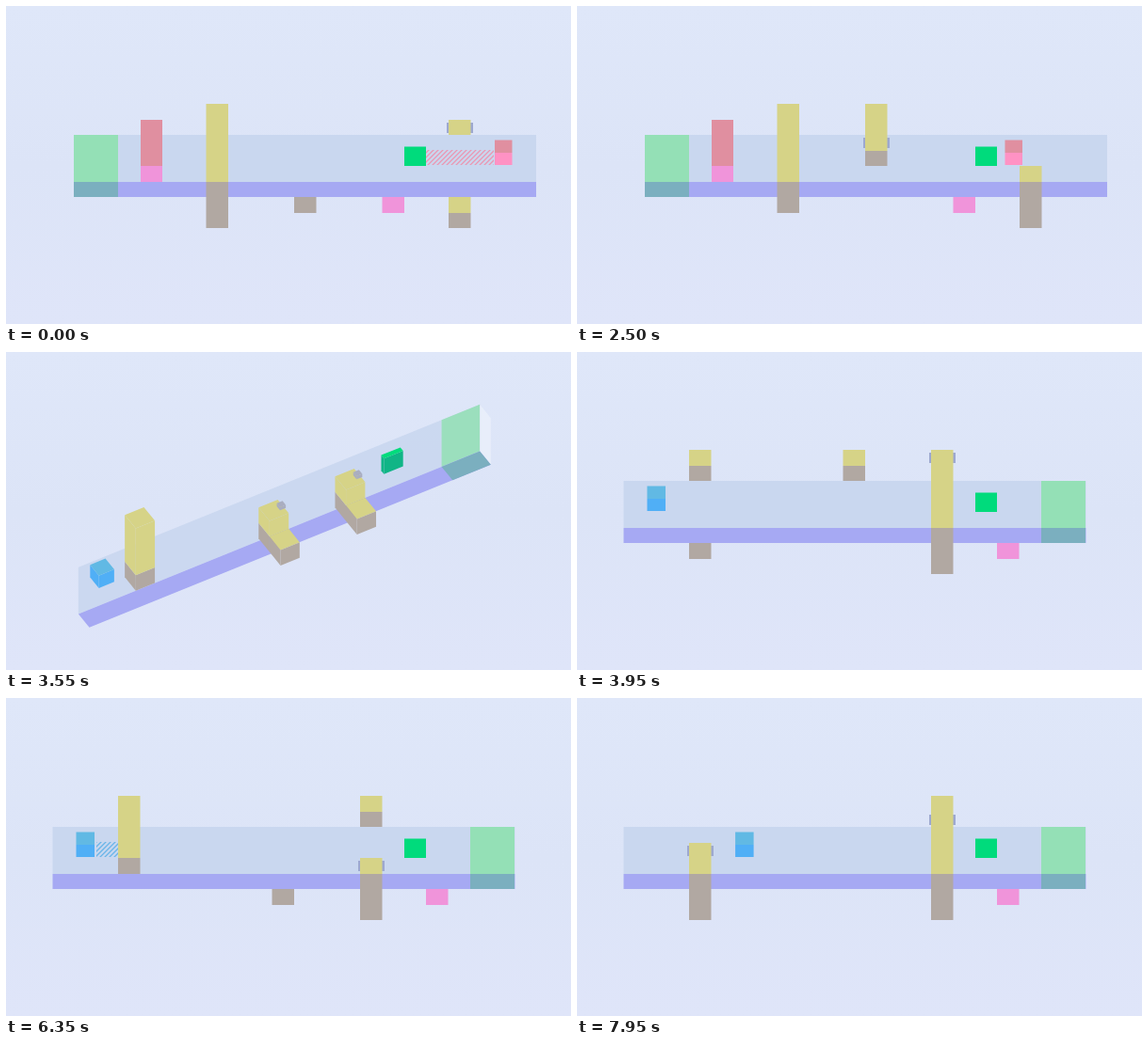
An HTML page with a canvas for the animation above (8 s loop, 600x338 px).

```html
<!DOCTYPE html>
<html lang="en">
<head>
<meta charset="utf-8">
<title>Turning bridge</title>
<style>
html, body { margin: 0; width: 100%; height: 100%; overflow: hidden; background: #dfe6f9; }
canvas { display: block; width: 600px; height: 338px; }
</style>
</head>
<body>
<canvas id="stage" width="600" height="338"></canvas>
<script>
const ctx = document.getElementById('stage').getContext('2d');
const LOOP = 8000, TURN_START = 2661, TURN_END = 3861, RING_PERIOD = 4800;
const UNIT = 23.4, ROW = 16.55, CX = 306, CY = 195, FLOOR_ROW = 5;
const C = {
  yellow: '#d6d387', brown: '#b1a8a2', floor: '#a6a9f3', teal: '#7bafbf',
  glass: '#c9d7ef', start: '#94e0b6', gate: '#f2f6fd', red: '#e08fa0',
  magenta: '#f094da', pink: '#ff92c4', sky: '#61b9e4', blue: '#50aff6',
  green: '#00db7c', deep: '#10b586', ring: '#9da8d0', peg: '#a9adc0'
};

const clamp = (v, a, b) => Math.min(b, Math.max(a, v));
const rowY = r => Math.round(104 + ROW * r);
const still = v => () => v;
// Straight motion through three key points at p = 0, 1 and 2.
const path = (a, b, c) => p => p < 1 ? a + (b - a) * p : b + (c - b) * (p - 1);
const wave = (mid, size, peak) => t =>
  Math.round(mid + size * Math.cos(2 * Math.PI * (t - peak) / RING_PERIOD));

function rect(x, y0, x1, y1, color) {
  ctx.fillStyle = color;
  ctx.fillRect(x, y0, x1 - x, y1 - y0);
}

function background() {
  const g = ctx.createLinearGradient(0, 0, 0, 338);
  g.addColorStop(0, '#dfe7f9');
  g.addColorStop(.5, '#dce4f7');
  g.addColorStop(1, '#dfe5f9');
  rect(0, 0, 600, 338, g);
}

function bridge(x, startX) {
  rect(x, 137, x + 491, 187, C.glass);
  rect(x, 187, x + 491, 203, C.floor);
  rect(startX, 137, startX + 47, 187, C.start);
  rect(startX, 187, startX + 47, 203, C.teal);
}

// Brown front below the floor edge; a single row shows one face only.
function piece(x, top, end) {
  if (end <= top) return;
  let split = Math.min(Math.max(FLOOR_ROW, top + 1), end - 1);
  if (end - top === 1 && top < FLOOR_ROW) split = end;
  rect(x, rowY(top), x + 23.5, rowY(split), C.yellow);
  rect(x, rowY(split), x + 23.5, rowY(end), C.brown);
}

// A column on the row grid with a gap that opens around one row.
function column({ x, top, end, gap = still(0), gapAt = 4, ring = still(-1) }, p, t) {
  const a = Math.round(top(p)), b = Math.round(end(p)), half = Math.round(gap(p) / 2);
  const r = ring(t), inGap = half && r >= gapAt - half && r < gapAt + half;
  if (r >= a && r < b && !inGap) rect(x - 2, rowY(r) + 3, x + 26, rowY(r) + 14, C.ring);
  if (!half) return piece(x, a, b);
  piece(x, a, gapAt - half);
  piece(x, gapAt + half, b);
}

const front = [
  { x: 212.5, top: still(0), end: path(8, 8, 7), gap: path(0, 2, 0), ring: wave(-1, 2, 1250) },
  { x: 306, top: path(6, 4, 0), end: path(7, 8, 4), ring: wave(3, 3, 1050) },
  { x: 470, top: path(1, 0, 4), end: path(8, 6, 8), gap: path(4, 0, 0), ring: wave(2, 2, 1600) }
];
const back = [
  { x: 376, top: still(0), end: still(8), gap: path(0, 2, 0), gapAt: 3, ring: wave(2, 2, 6350) },
  { x: 282.5, top: path(0, 6, 7), end: path(2, 7, 7) },
  { x: 119, top: path(0, 0, 3), end: path(7, 5, 8), gap: path(4, 0, 0), ring: wave(0, 3, 8000) }
];

function columns(list, t, start, mid, end) {
  const p = t < mid ? (t - start) / (mid - start) : 1 + (t - mid) / (end - mid);
  list.forEach(c => column(c, clamp(p, 0, 2), t));
}

function hatch(x0, x1, color, t) {
  ctx.save();
  ctx.beginPath();
  ctx.rect(x0, 153, x1 - x0, 16);
  ctx.clip();
  ctx.strokeStyle = color;
  ctx.lineWidth = 1.3;
  ctx.beginPath();
  for (let x = x0 - 24 + t * .02 % 5; x < x1; x += 5) {
    ctx.moveTo(x, 170);
    ctx.lineTo(x + 18, 152);
  }
  ctx.stroke();
  ctx.restore();
}

const slide = (t, start) => clamp((t - start) * .14, 0, 4 * UNIT);

function player(x, w, top, face) {
  rect(x, 142.5, x + w, 156, top);
  rect(x, 156, x + w, 169, face);
}

function frontView(t) {
  bridge(72, 72);
  rect(143, 121, 166, 170, C.red);
  rect(143, 170, 166, 187, C.magenta);
  rect(399.5, 203, 423, 220, C.magenta);
  if (t < 2040) hatch(446, 518, '#ea96b2', t);
  player(519 - slide(t, 2040), 18.5, C.red, C.pink);
  rect(423, 149.5, 446, 170, C.green);
  columns(front, t, 0, 1250, 2500);
}

function backView(t) {
  bridge(49.5, 493);
  rect(446, 203, 469.5, 220, C.magenta);
  if (t > 5150 && t < 7280) hatch(96, 119, '#69b5e8', t);
  player(74.5 + slide(t, 7280), 19.5, C.sky, C.blue);
  rect(423, 149.5, 446, 170, C.green);
  columns(back, t, 3950, 6350, 7950);
}

function turningView(angle) {
  const s = Math.sin(angle), c = Math.cos(angle), near = Math.sign(c) || 1;

  function quad(color, ...points) {
    ctx.fillStyle = color;
    ctx.beginPath();
    for (const [x, h, z] of points)
      ctx.lineTo(CX + UNIT * (x * c - z * s), CY + ROW * (x * s + z * c - h));
    ctx.fill();
  }
  const flat = (x0, x1, z0, z1, h, color) =>
    quad(color, [x0, h, z0], [x1, h, z0], [x1, h, z1], [x0, h, z1]);
  const along = (x0, x1, z, h0, h1, color) =>
    quad(color, [x0, h0, z], [x1, h0, z], [x1, h1, z], [x0, h1, z]);
  const across = (x, z0, z1, h0, h1, color) =>
    quad(color, [x, h0, z0], [x, h0, z1], [x, h1, z1], [x, h1, z0]);

  // Box around (x, z): lower colour up to split, upper colour above and on top.
  function box(x, z, w, d, h0, split, h1, upper = C.yellow, lower = C.brown) {
    if (Math.abs(c) > .85 && z * near > .5) return;
    const x0 = x - w / 2, x1 = x + w / 2, z0 = z - d / 2, z1 = z + d / 2;
    for (const [a, b, color] of [[h0, split, lower], [split, h1, upper]]) {
      along(x0, x1, near > 0 ? z1 : z0, a, b, color);
      across(x1, z0, z1, a, b, color);
    }
    flat(x0, x1, z0, z1, h1, upper);
  }
  const cube = (x, z, upper, lower) => box(x, z, .8, .8, 1.07, 1.87, 1.87, upper, lower);
  const panel = (x, z, upper, lower) => box(x, z, 1, .25, 1, 2, 2, upper, lower);
  const peg = (x, z, h) => box(x, z, .3, .3, h, h, h + .2, C.peg, C.peg);

  ctx.globalAlpha = Math.abs(c);
  along(-10, 11, -near / 2, 0, 3, C.glass);
  along(-10, -8, -near / 2, 0, 3, C.start);
  ctx.globalAlpha = s;
  across(-10, -.5, .5, 0, 3, C.gate);
  ctx.globalAlpha = 1;

  panel(-5.5, .65, C.green, C.deep);
  flat(-10, 11, -.5, .5, 0, C.floor);
  flat(-10, -8, -.5, .5, 0, C.teal);

  for (const x of [-3.5, .5]) {
    for (const z of [-near, 0, near])
      if (x < 0 || z >= 0) box(x, z, 1, 1, -1, 0, z < 0 ? 4 : z);
    peg(x - .4, 1, 1);
  }
  box(-6.5, -1, 1, 1, 0, 1, 3, '#eba0b2', '#f892dc');

  cube(5.5, -1.07, C.red, C.pink);
  panel(5.5, -.65, C.green, C.deep);
  panel(5.5, -1.47);
  peg(5.1, -1.07, 2);

  cube(9.5, .95, C.sky, C.blue);
  box(7.5, 1, 1, 1, 0, 1, 4);
}

function draw(t) {
  background();
  if (t < TURN_START) frontView(t);
  else if (t > TURN_END) backView(t);
  else {
    const p = (t - TURN_START) / (TURN_END - TURN_START);
    turningView(Math.PI * p * p * (3 - 2 * p));
  }
}

const begin = performance.now();
function tick() {
  draw((performance.now() - begin) % LOOP);
  requestAnimationFrame(tick);
}
tick();
</script>
</body>
</html>
```
